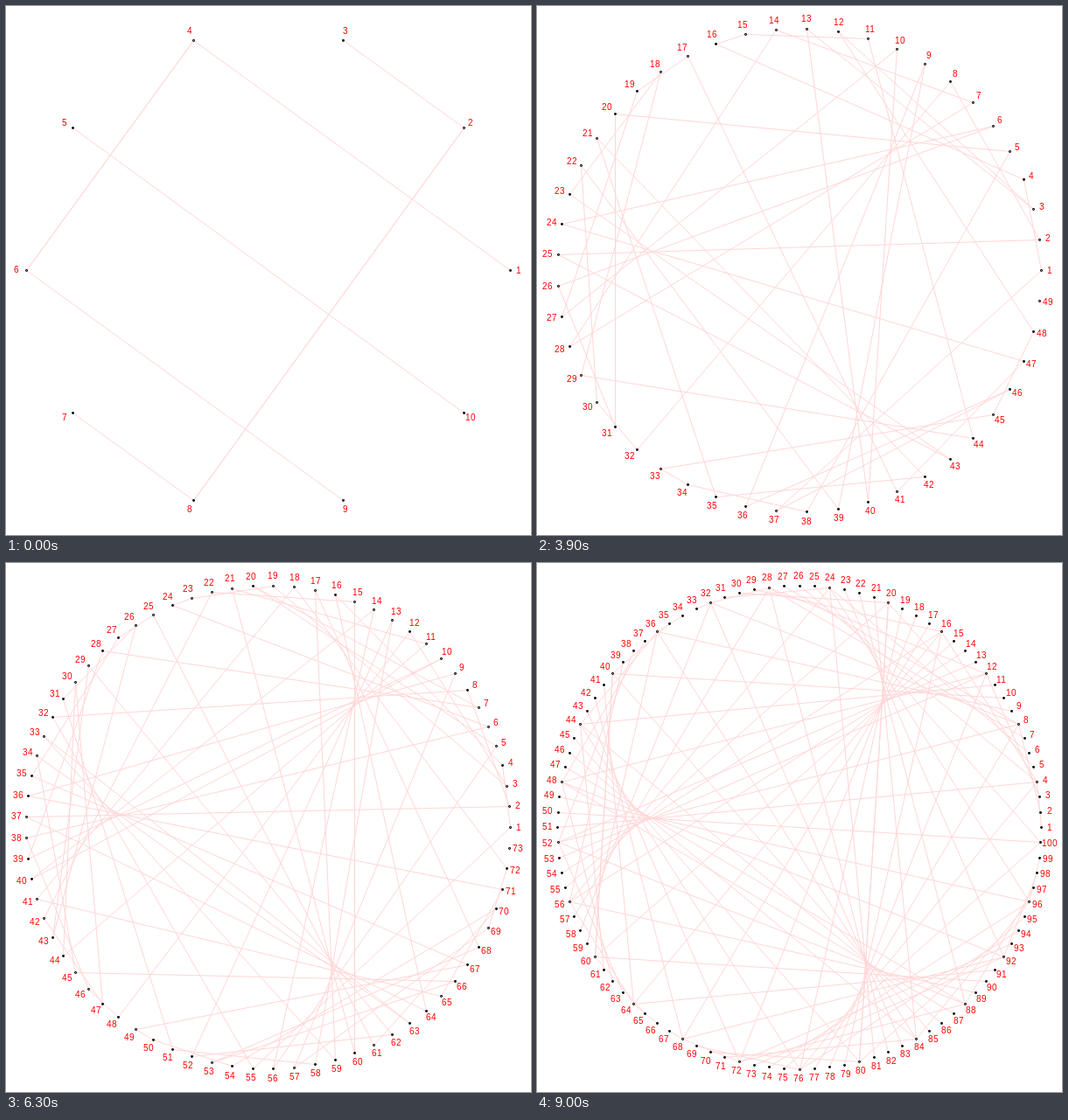
Write an HTML page with a canvas that moves like this. It is 600x605 px and loops after 9100 ms.

```html
<!DOCTYPE html>
<html lang="en">
<head>
<meta charset="utf-8">
<title>Times four on a circle</title>
<style>
  html, body { margin: 0; width: 100%; height: 100%; overflow: hidden; background: #fff; }
  canvas { display: block; }
</style>
</head>
<body>
<canvas id="stage" width="600" height="605"></canvas>
<script>
const ctx = document.getElementById('stage').getContext('2d');
const STEP = 100, FIRST = 10, LAST = 100, FACTOR = 4;
const LOOP = (LAST - FIRST + 1) * STEP;
const DIGIT = 6;

ctx.font = '10px "Liberation Sans", Arial, sans-serif';
ctx.letterSpacing = '0.44px';
ctx.lineWidth = 1;

// Points run counterclockwise; number 1 sits at the right.
function place(i, n, cx, cy, r) {
  const a = (i - 1) / n * 2 * Math.PI;
  return [cx + r * Math.cos(a), cy - r * Math.sin(a)];
}

function drawDot([x, y], hollow) {
  ctx.fillStyle = '#000';
  ctx.beginPath();
  ctx.arc(x, y, 1.45, 0, 2 * Math.PI);
  ctx.fill();
  if (hollow) {
    ctx.fillStyle = '#aaa';
    ctx.fillRect(x - 0.5, y - 0.5, 1, 1);
  }
}

function drawLabel(i, n) {
  const [x, y] = place(i, n, 299, 302, 287.3);
  const text = String(i);
  ctx.fillStyle = '#f00';
  ctx.fillText(text, Math.round(x - text.length * DIGIT / 2), Math.round(y + 3.5));
}

function draw(n) {
  const points = [], hollow = new Set();
  for (let i = 1; i <= n; i++) {
    points[i] = place(i, n, 300, 302.5, 276.5).map(v => Math.floor(v + 1e-6) + 0.5);
  }

  ctx.fillStyle = '#fff';
  ctx.fillRect(0, 0, 600, 605);

  ctx.strokeStyle = '#ffd6d6';
  for (let i = 1; i <= n; i++) {
    const j = i * FACTOR % n || n;
    ctx.beginPath();
    ctx.moveTo(...points[i]);
    ctx.lineTo(...points[j]);
    ctx.stroke();
    // A line that returns to an earlier point opens its dot.
    if (j < i || (j === i && n % 2)) hollow.add(j);
  }

  for (let i = 1; i <= n; i++) {
    drawDot(points[i], hollow.has(i));
    drawLabel(i, n);
  }
}

let shown = 0;
const start = performance.now();

function tick() {
  const time = Math.max(0, performance.now() - start) % LOOP;
  const n = FIRST + Math.floor(time / STEP);
  if (n !== shown) draw(shown = n);
  requestAnimationFrame(tick);
}
tick();
</script>
</body>
</html>
```
